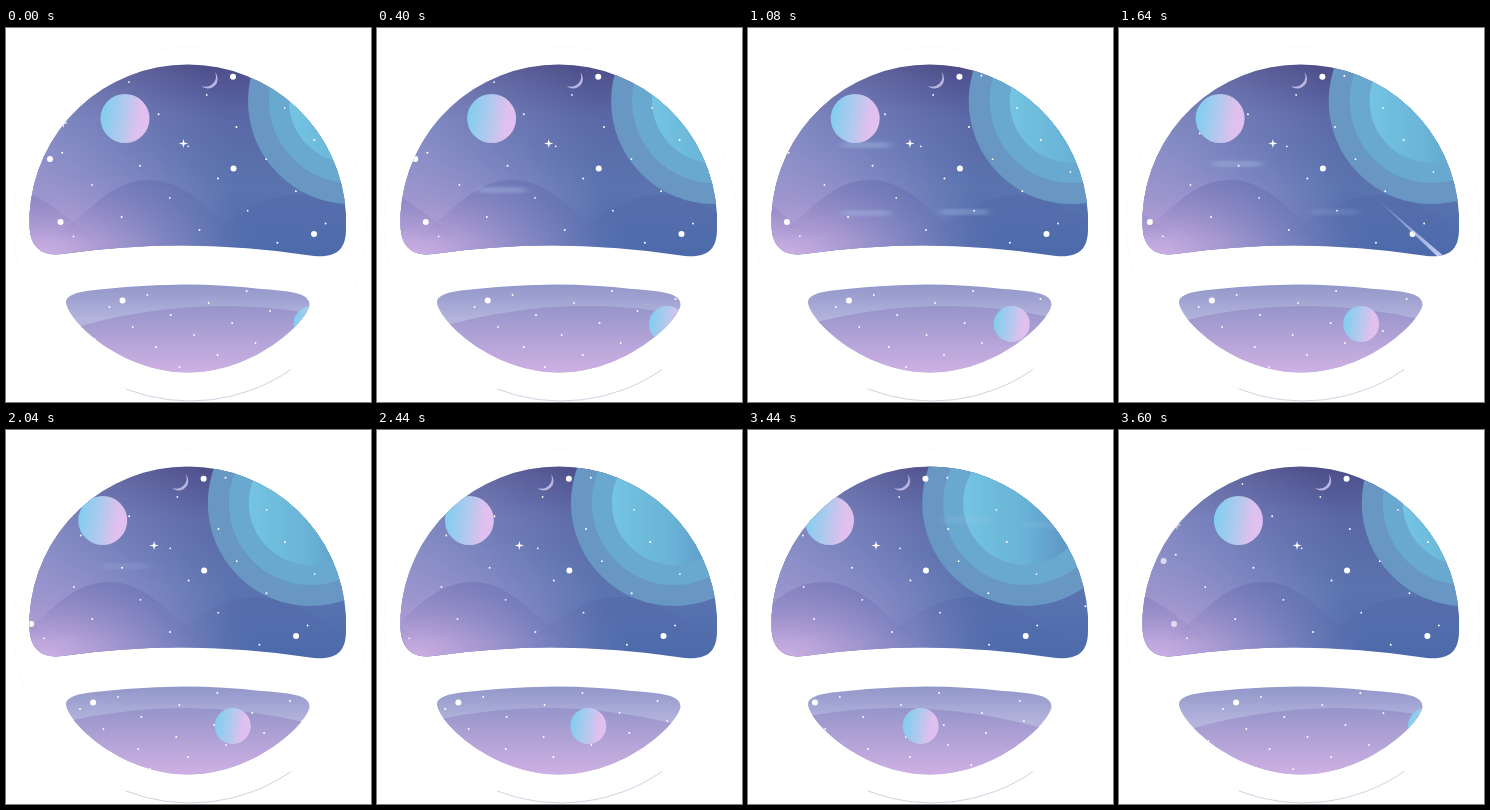
Write an HTML page that moves like this. It is 365x374 px and loops after 3.64 s.

```html
<!DOCTYPE html>
<html lang="en">
<head>
<meta charset="utf-8">
<title>Space window</title>
<style>
html, body { margin: 0; width: 100%; height: 100%; overflow: hidden; background: #fff; }
svg { display: block; width: 365px; height: 374px; }
</style>
</head>
<body>
<svg viewBox="0 0 365 374" xmlns="http://www.w3.org/2000/svg">
  <defs>
    <clipPath id="dome"><path d="M23.500 186A158.500 158.500 0 0 1 340 186V201C340 221 331 230 308 228Q180 208 56 226C31 229 23.500 214 23.500 196Z"/></clipPath>
    <clipPath id="lens"><path d="M60 275C59 262 92 262 120 259Q190 253 255 261C285 263 304 265 303.500 277C301 294 248 344.500 182 344.500C116 344.500 63 294 60 275Z"/></clipPath>
    <linearGradient id="sky" x1="0" y1="0" x2="0" y2="1">
      <stop offset="0" stop-color="#4b4983"/><stop offset=".3" stop-color="#5a67a6"/>
      <stop offset=".65" stop-color="#5a74b0"/><stop offset="1" stop-color="#4b69aa"/>
    </linearGradient>
    <radialGradient id="haze" gradientUnits="userSpaceOnUse" cx="20" cy="145" r="210">
      <stop offset="0" stop-color="#9a9bd0" stop-opacity=".9"/><stop offset="1" stop-color="#8590c8" stop-opacity="0"/>
    </radialGradient>
    <radialGradient id="glow" gradientUnits="userSpaceOnUse" cx="35" cy="235" r="220" gradientTransform="translate(0 82) scale(1 .65)">
      <stop offset="0" stop-color="#d3b4e6"/><stop offset=".35" stop-color="#ae9bd4" stop-opacity=".85"/>
      <stop offset="1" stop-color="#7d82c0" stop-opacity="0"/>
    </radialGradient>
    <linearGradient id="hill" gradientUnits="userSpaceOnUse" x1="0" y1="150" x2="0" y2="212">
      <stop offset="0" stop-color="#4f559c" stop-opacity=".28"/><stop offset="1" stop-color="#4f559c" stop-opacity="0"/>
    </linearGradient>
    <linearGradient id="ball" x2="1" y2=".15">
      <stop offset=".05" stop-color="#7dcfef"/><stop offset=".5" stop-color="#b0c9ee"/><stop offset=".85" stop-color="#dfc0ee"/>
    </linearGradient>
    <linearGradient id="core">
      <stop offset="0" stop-color="#74c4e2"/><stop offset=".5" stop-color="#68b2d6"/><stop offset="1" stop-color="#5a8abb"/>
    </linearGradient>
    <linearGradient id="back" x1="0" y1="0" x2="0" y2="1">
      <stop offset="0" stop-color="#8f95c8"/><stop offset=".4" stop-color="#b3b3dc"/>
    </linearGradient>
    <linearGradient id="front" gradientUnits="userSpaceOnUse" x1="0" y1="278" x2="0" y2="344">
      <stop offset="0" stop-color="#9695ca"/><stop offset="1" stop-color="#ceb0e3"/>
    </linearGradient>
    <linearGradient id="tail" gradientUnits="userSpaceOnUse" x1="-64" y1="-58" x2="0" y2="0">
      <stop offset="0" stop-color="#c5cdf2" stop-opacity=".2"/><stop offset="1" stop-color="#c5cdf2"/>
    </linearGradient>
    <filter id="soft" x="-20%" y="-150%" width="140%" height="400%"><feGaussianBlur stdDeviation="4 1.300"/></filter>
  </defs>

  <circle cx="184" cy="196" r="177" fill="#fff" stroke="#fafaff" stroke-width=".8"/>
  <path d="M120 361A177 177 0 0 0 285 341.500" fill="none" stroke="#b5b5cc" stroke-width=".6"/>

  <g clip-path="url(#dome)">
    <rect x="23" y="27" width="318" height="204" fill="url(#sky)"/>
    <rect x="23" y="27" width="318" height="204" fill="url(#haze)"/>
    <rect x="23" y="27" width="318" height="204" fill="url(#glow)"/>
    <g id="hills" fill="url(#hill)"></g>
    <g id="rings">
      <circle cy="73" r="103" fill="#6797c2"/>
      <circle cy="73" r="82" fill="#69a9cf"/>
      <circle cy="73" r="62" fill="url(#core)"/>
    </g>
    <g id="clouds" fill="#a9c4e8" filter="url(#soft)"></g>
    <g id="domeStars" fill="#fff"></g>
    <path id="moon" d="M209 44A9.600 9.600 0 0 1 195 57.500A10.300 10.300 0 0 0 209 44Z" fill="#b9b4e2"/>
    <circle id="planet" cy="90.500" r="24.500" fill="url(#ball)"/>
    <path id="comet" d="M-64 -58L1.500 -2L2 2L-2 1Z" fill="url(#tail)"/>
  </g>

  <g clip-path="url(#lens)">
    <rect x="58" y="254" width="248" height="92" fill="url(#back)"/>
    <path id="ridge" d="M-200 317Q0 239 200 317V350H-200Z" fill="url(#front)"/>
    <g id="lensStars" fill="#fff"></g>
    <circle id="globe" cy="296" r="18" fill="url(#ball)"/>
  </g>
</svg>
<script>
const LOOP = 3640, RESTART = 3600;
// Drift in px per ms, one value for each depth
const FAST = -0.0144, SLOW = -0.0088, LAND = -0.0197;
const $ = id => document.getElementById(id);
const clamp = v => Math.max(0, Math.min(1, v));
const movers = [];

function add(parent, tag, attrs) {
  const el = document.createElementNS('http://www.w3.org/2000/svg', tag);
  for (const k in attrs) el.setAttribute(k, attrs[k]);
  $(parent).appendChild(el);
  return el;
}
function move(el, x, speed) {
  movers.push({ el, x, speed });
  return el;
}
function star(parent, x, y, r, speed = FAST) {
  return move(add(parent, 'circle', { cy: y, r }), x, speed);
}
function sparkle(x, y, r) {
  const k = r * 0.2;
  const d = `M0 ${y - r}L${k} ${y - k}L${r} ${y}L${k} ${y + k}L0 ${y + r}L${-k} ${y + k}L${-r} ${y}L${-k} ${y - k}Z`;
  return move(add('domeStars', 'path', { d }), x, FAST);
}
// Small stars: rows from top to bottom, spread sideways by the golden ratio
function scatter(parent, n, left, width, top, height) {
  for (let i = 0; i < n; i++) {
    const x = left + width * (i * 0.618 % 1), y = top + height * (i + 0.5) / n;
    star(parent, x, y, 0.9 + 0.1 * (i % 2), i % 3 ? FAST : SLOW);
  }
}

[160, 152, 167].forEach((y, i) => {
  const d = `M-110 214C-70 204 -48 ${y} 0 ${y}S70 204 110 214Z`;
  move(add('hills', 'path', { d }), 148 * i - 5, LAND);
});

// These leave on the left, so they fade in when the scene restarts
const faders = [sparkle(57.3, 95, 5), star('domeStars', 44, 131, 3), star('domeStars', 54.5, 194, 3)];
sparkle(177.5, 115.5, 4.6);
for (const [x, y] of [[212, 33.5], [227, 48.7], [227.5, 140.5]]) star('domeStars', x, y, 3);
star('domeStars', 308, 206, 3, SLOW);
star('lensStars', 116.5, 272.5, 3);
scatter('domeStars', 28, 45, 330, 38, 180);
scatter('lensStars', 21, 80, 260, 257, 84);

move($('rings'), 345, LAND);
move($('ridge'), 218, LAND);
move($('moon'), 0, FAST);
move($('planet'), 119, -0.0109);
move($('globe'), 305.5, -0.0386);

// Cloud streaks: centre and start time
const clouds = [
  [125, 162, 50], [118, 117, 700], [118, 185, 700], [216, 184, 850],
  [119, 136, 1250], [216, 90, 2650], [297, 95, 2650]
].map(([x, y, start]) => ({
  el: add('clouds', 'rect', { x: x - 24, y: y - 3, width: 48, height: 6, rx: 3 }), start
}));

function draw(t) {
  const u = t < RESTART ? t : t - LOOP;
  for (const m of movers) m.el.setAttribute('transform', `translate(${(m.x + m.speed * u).toFixed(3)} 0)`);
  for (const el of faders) el.setAttribute('opacity', clamp(1 + u / 120));
  for (const c of clouds) {
    const age = u - c.start;
    c.el.setAttribute('opacity', 0.35 * clamp(Math.min(age, 900 - age) / 250));
  }
  const go = (u - 1640) * 0.4;
  $('comet').setAttribute('transform', `translate(${322 + go * 0.74} ${229 + go * 0.67})`);
  $('comet').setAttribute('opacity', clamp(Math.min(u - 1440, 1840 - u) / 100));
}

function tick() {
  draw(performance.now() % LOOP);
  requestAnimationFrame(tick);
}
tick();
</script>
</body>
</html>
```
